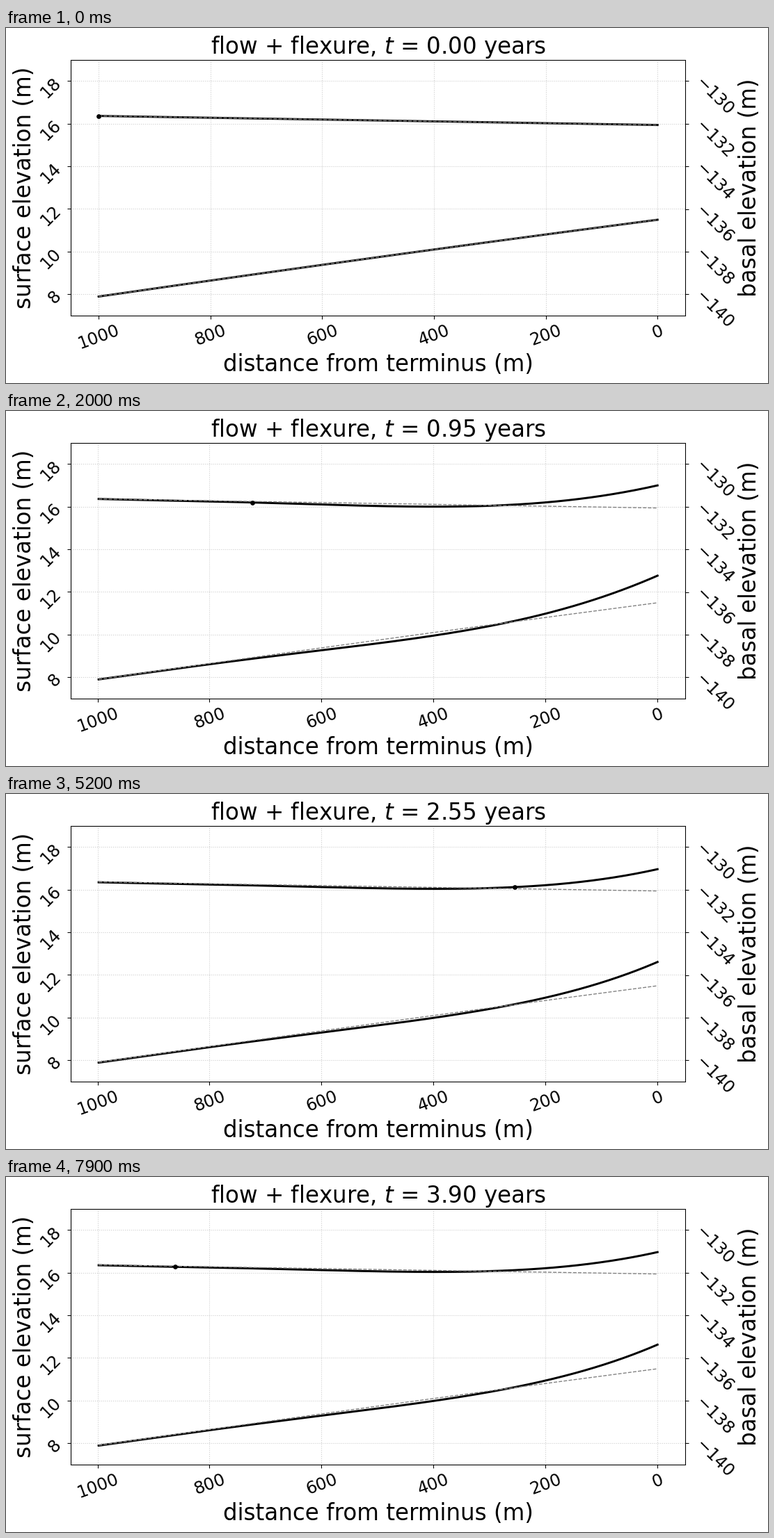
Animation of 1095x511 px, one loop 8000 ms. Source, as a matplotlib script:

```python
import matplotlib.pyplot as plt
import numpy as np
from matplotlib.animation import FuncAnimation

W, H, DPI = 1095, 511, 64
FRAMES, INTERVAL = 80, 100
LEFT, RIGHT, TOP_Y, BOTTOM = 93, 976.4, 45.6, 414   # axes box in pixels
PX = 72 / DPI        # points per pixel
U = 1.354 * PX       # scale of the default line and tick sizes
BIG, SMALL = 32.5 * PX, 24.2 * PX
M = 12 / (BOTTOM - TOP_Y)   # metres per pixel on the vertical axis

plt.rcParams.update({
    "font.family": "DejaVu Sans",
    "axes.linewidth": 0.8 * U,
    "xtick.major.width": 0.8 * U, "ytick.major.width": 0.8 * U,
    "xtick.major.size": 3.5 * U, "ytick.major.size": 3.5 * U,
    "xtick.major.pad": 3.5 * U, "ytick.major.pad": 3.5 * U,
})

# Vertical deflection every 200 m from the terminus: early, peak, settled
TOP = np.array([[29, 10.5, -0.2, -4, -3.2, -1],
                [32.5, 5.4, -3.3, -2.8, -0.9, 0],
                [31.5, 5.7, -2.2, -2.2, -1, -0.4]]) * M
BASE = np.array([[31.5, 11.3, 0, -4.2, -3.2, -1],
                 [39, 5.5, -4.5, -3.5, -1, 0],
                 [34.7, 4.2, -3.5, -2.6, -0.9, -0.3]]) * M


def surface(d):
    return 15.938 + 0.424 * d / 1000


def bed(d):
    u = d / 1000
    return 11.494 - 3.6 * u + 0.19 * u * (1 - u)


def bend(shapes, step, d):
    early, peak, settled = shapes
    if step <= 5:
        w = early * (1 - np.exp(-step / 2)) / (1 - np.exp(-2.5))
    elif step <= 19:
        w = early + (peak - early) * (1 - ((19 - step) / 14) ** 2)
    else:
        s = step - 19
        w = settled + (peak - settled) * np.exp(-s / 15) * np.cos(2 * np.pi * s / 76)
    return np.polyval(np.polyfit(np.arange(6), w, 5), d / 200)


def parcel(step):
    """Distance of the drifting dot from the terminus."""
    n = step % 68.54
    return 998 - 14.39 * n - 0.0036 * n * n


fig = plt.figure(figsize=(W / DPI, H / DPI), dpi=DPI, facecolor="white")
ax = fig.add_axes([LEFT / W, 1 - BOTTOM / H, (RIGHT - LEFT) / W, (BOTTOM - TOP_Y) / H])
ax.set_ylim(7, 19)
ax.set_yticks(range(8, 19, 2))
ax.set_xticks(range(0, 1001, 200))
ax.grid(linestyle=":", color="0.8", linewidth=0.8 * U)
ax.set_axisbelow(True)
ax.tick_params(axis="x", labelsize=SMALL, labelrotation=20)
ax.tick_params(axis="y", labelsize=SMALL, labelrotation=45)

right = ax.twinx()
right.set_ylim(-141, -129)
right.set_yticks(range(-140, -129, 2))
right.tick_params(axis="y", labelsize=SMALL, labelrotation=-45)
for spine in right.spines.values():
    spine.set_visible(False)


def label(x, y, text, angle=0):
    fig.text(x / W, 1 - y / H, text, fontsize=BIG, rotation=angle,
             rotation_mode="anchor", ha="center", va="baseline")


label(535, 494, "distance from terminus (m)")
label(36, 230, "surface elevation (m)", 90)
label(1078, 230, "basal elevation (m)", 90)
title = ax.set_title("", fontsize=BIG, pad=6 * U)

solid = dict(color="black", linewidth=2.2 * U)
dashed = dict(color="gray", linewidth=U, linestyle="--")
top, = ax.plot([], [], **solid)
base, = ax.plot([], [], **solid)
top0, = ax.plot([], [], **dashed)
base0, = ax.plot([], [], **dashed)
dot, = ax.plot([], [], "o", color="black", markersize=5 * U, markeredgewidth=0)


def draw(i):
    step = max(i - 1, 0)
    start = 998 if i else 1000
    d = np.linspace(start, 0, 400)
    ax.set_xlim(1.05 * start, -0.05 * start)
    top0.set_data(d, surface(d))
    base0.set_data(d, bed(d))
    top.set_data(d, surface(d) + bend(TOP, step, d))
    base.set_data(d, bed(d) + bend(BASE, step, d))
    x = parcel(step) if i else start
    dot.set_data([x], [surface(x) + bend(TOP, step, x)])
    title.set_text(f"flow + flexure, $t$ = {0.05 * step:.2f} years")
    return top, base, top0, base0, dot, title


anim = FuncAnimation(fig, draw, frames=FRAMES, interval=INTERVAL,
                     init_func=lambda: draw(0), repeat=True, repeat_delay=0)
plt.show()
```
